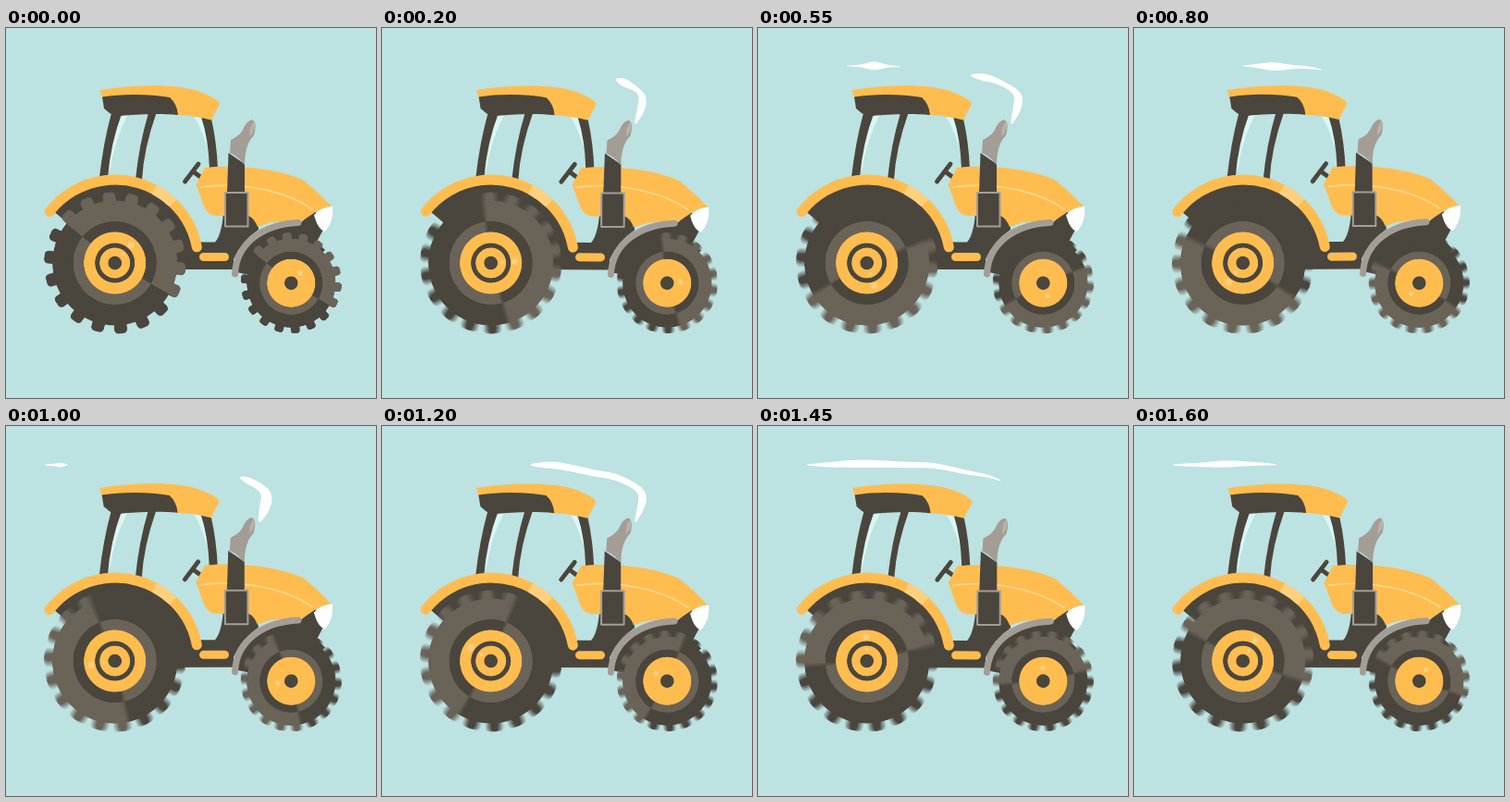
Write an HTML page with a canvas that moves like this. It is 400x400 px and loops after 1650 ms.

```html
<!DOCTYPE html>
<html lang="en">
<head>
<meta charset="utf-8">
<title>Tractor</title>
<style>
  html, body { margin: 0; width: 100%; height: 100%; overflow: hidden; background: #bce2e1; }
  canvas { display: block; width: 400px; height: 400px; }
</style>
</head>
<body>
<canvas id="stage"></canvas>
<script>
const LOOP = 1650, STEP = 50, TAU = Math.PI * 2, RAD = Math.PI / 180;
const SKY = '#bce2e1', ORANGE = '#ffbd50', PALE = '#ffd07d', DARK = '#4a463d',
      TAUPE = '#6a6358', GREY = '#a39d96', SILVER = '#b8b2aa', GLASS = '#d9f6f4';

function makeCanvas(size, scale, el = document.createElement('canvas')) {
  el.width = el.height = size * scale;
  const c = el.getContext('2d');
  c.scale(scale, scale);
  return c;
}

const dpr = window.devicePixelRatio || 1;
const view = makeCanvas(400, dpr, document.getElementById('stage'));
const scene = makeCanvas(400, dpr);
const exposure = makeCanvas(400, dpr);
const clamp01 = v => Math.max(0, Math.min(1, v));
const bell = v => Math.exp(-v * v);

function disc(c, x, y, r, color) {
  c.fillStyle = color;
  c.beginPath();
  c.arc(x, y, r, 0, TAU);
  c.fill();
}

// ---- wheels ----
function makeWheel({ outer, tire, rim, hub, rings, spots }) {
  const c = makeCanvas(160, 2);
  c.translate(80, 80);

  const tread = color => {
    disc(c, 0, 0, tire, color);
    const w = outer * 0.18;
    for (let i = 0; i < 18; i++) {
      c.save();
      c.rotate((5 + i * 20) * RAD);
      c.beginPath();
      c.roundRect(tire - 10, -w / 2, outer - tire + 10, w, outer * 0.055);
      c.fill();
      c.restore();
    }
  };
  const sector = (from, to, paint) => {
    c.save();
    c.beginPath();
    c.moveTo(0, 0);
    c.arc(0, 0, 80, from * RAD, to * RAD);
    c.clip();
    paint();
    c.restore();
  };

  tread(DARK);
  sector(-141, 30, () => tread(TAUPE));
  disc(c, 0, 0, rim, DARK);
  sector(30, 219, () => disc(c, 0, 0, rim, TAUPE));
  disc(c, 0, 0, hub, ORANGE);
  for (const [r, color] of rings) disc(c, 0, 0, r, color);
  for (const [d, r] of spots)
    disc(c, d * Math.cos(-48 * RAD), d * Math.sin(-48 * RAD), r, PALE);
  return c.canvas;
}

const rear = makeWheel({
  outer: 76.5, tire: 67.5, rim: 45, hub: 33.5,
  rings: [[21.5, DARK], [16.5, ORANGE], [7.3, DARK]],
  spots: [[26, 3.8], [12.5, 2]]
});
const front = makeWheel({
  outer: 54.5, tire: 48, rim: 34, hub: 26,
  rings: [[7.2, DARK]],
  spots: [[14.5, 2.8]]
});

function drawWheel(c, sprite, x, y, angle) {
  c.save();
  c.translate(x, y);
  c.rotate(angle * RAD);
  c.drawImage(sprite, -80, -80, 160, 160);
  c.restore();
}

// ---- smoke ----
const trail = [[274, 104], [281, 74], [257, 57], [225, 50], [190, 43],
               [160, 42], [130, 41], [100, 41], [70, 42], [42, 42]];
const puffs = [
  { start: 50, release: 320, thin: 3.5, bulge: 10 },
  { start: 350, release: 640, thin: 5, bulge: 7 },
  { start: 850, release: 1370, thin: 7, bulge: 4 }
];

// Point on a smooth curve through the trail, 0 at the pipe and 1 at the far end.
function trailPoint(p) {
  const last = trail.length - 1, u = clamp01(p) * last;
  const i = Math.min(Math.floor(u), last - 1), k = u - i;
  const at = j => trail[Math.max(0, Math.min(last, j))];
  return [0, 1].map(n => {
    const a = at(i - 1)[n], b = at(i)[n], c = at(i + 1)[n], d = at(i + 2)[n];
    return b + 0.5 * k * (c - a + k * (2 * a - 5 * b + 4 * c - d + k * (3 * (b - c) + d - a)));
  });
}

// The head leaves at once, the tail lets go later and catches up.
function drawPuff(c, { start, release, thin, bulge }, t) {
  const head = clamp01((t - start) / 630), tail = clamp01((t - release) / 400);
  if (head <= tail) return;
  const heavy = 0.92 - 0.75 * tail;
  const left = [], right = [], count = 80;
  for (let i = 0; i <= count; i++) {
    const f = i / count, p = tail + (head - tail) * f;
    const [x, y] = trailPoint(p);
    const [x1, y1] = trailPoint(p - 0.003), [x2, y2] = trailPoint(p + 0.003);
    const len = Math.hypot(x2 - x1, y2 - y1);
    const swell = bulge * bell((f - heavy) / 0.2) + 6 * bell((p - 0.07) / 0.06);
    const ends = Math.sqrt(clamp01(Math.sin(Math.PI * f)));
    const r = ends * (thin + swell) * (1 - 0.6 * tail) / 2;
    const nx = (y1 - y2) / len * r, ny = (x2 - x1) / len * r;
    left.push([x + nx, y + ny]);
    right.unshift([x - nx, y - ny]);
  }
  c.fillStyle = '#fff';
  c.beginPath();
  for (const point of left.concat(right)) c.lineTo(...point);
  c.fill();
}

// ---- body ----
function drawBody(c) {
  const fill = (color, d) => {
    c.fillStyle = color;
    c.fill(new Path2D(d));
  };
  const line = (color, width, d) => {
    c.strokeStyle = color;
    c.lineWidth = width;
    c.stroke(new Path2D(d));
  };
  const fender = (color, from, to) => {
    c.strokeStyle = color;
    c.lineWidth = 11;
    c.beginPath();
    c.arc(118, 254, 90, from * RAD, to * RAD);
    c.stroke();
  };
  c.lineCap = c.lineJoin = 'round';

  // cab
  fill(GLASS, 'M124 93H132Q117 122 113 152L109 158Q113 125 124 93Z');
  fill(GLASS, 'M203 95L212 97Q219 120 220 140Q215 115 203 95Z');
  fill(DARK, 'M114 92L125 93Q113 125 110 162H101Q105 125 114 92Z');
  fill(DARK, 'M154 92H162.5Q149 130 147 164H140Q144 125 154 92Z');
  fill(DARK, 'M211 96L222 98Q228 125 229 153H220Q219 120 211 96Z');
  fill(ORANGE, 'M101.5 67C140 61 185 60 210 69Q230 77 231 82L222 99.5Q205 95 186 94L104 76Z');
  fill(DARK, 'M104 74.5C125 71 155 71 177 75Q185 82 186 94C165 92 140 93 118 95.5Q111 92 106 87Z');
  line(DARK, 4.8, 'M193.5 166L208 147M202 155L213 163');

  // chassis
  fill(DARK, 'M235 200H262Q274 207 273 218Q255 230 246 250V261H150V231.5H226Q233 224 235 200Z');
  fill(DARK, 'M249 264C251 232 280 213 318 211L334 197L343 218L336 231L345 240L308 276Z');
  line(ORANGE, 9, 'M213.5 247.5H236.5');

  // hood
  fill(ORANGE, 'M215 151C250 147 298 153 322 165Q338 178 352 193Q341 194 333 200L318 210Q292 206 272 215Q268 205 262 203H226Q217 202 213 190L205.5 169Z');
  line('#ffd98f', 1.6, 'M210 172C250 166 302 175 331 196');
  fill('#fff', 'M353 193Q355 208 345 220Q337 218 333 202Q342 193 353 193Z');
  line(GREY, 7, 'M247.5 266C249 232 279 212 316 210.5');

  // exhaust
  fill(DARK, 'M240.5 135L258 147V179H239Z');
  fill(GREY, 'M242 135L243 121Q254 116 257 108Q260 101 266 99Q272 102 268 116Q258 126 258 148Q250 138 242 135Z');
  fill(SILVER, 'M268 101Q272 106 264 117Q262 108 268 101Z');
  fill(DARK, 'M237 178H261.5V214.5H237Z');
  line(GREY, 2, 'M237 178H261.5V214.5H237Z');

  // rear fender
  c.fillStyle = DARK;
  c.beginPath();
  c.moveTo(118, 254);
  c.arc(118, 254, 87, 220 * RAD, 349 * RAD);
  c.fill();
  fender(ORANGE, 218, 349);
  c.lineCap = 'butt';
  fender(PALE, 298, 314);
}

function draw(t) {
  scene.fillStyle = SKY;
  scene.fillRect(0, 0, 400, 400);
  puffs.forEach(p => drawPuff(scene, p, t));

  // The body rocks slightly around the rear axle.
  scene.save();
  scene.translate(118, 254);
  scene.rotate(0.22 * Math.sin(3 * Math.PI * t / LOOP) * RAD);
  scene.translate(-118, -254);
  drawBody(scene);
  scene.restore();

  // Averaging several exposures blurs the turning wheels.
  const copies = t ? 6 : 1;
  for (let i = 0; i < copies; i++) {
    const angle = 360 * t / LOOP + (i - (copies - 1) / 2);
    exposure.drawImage(scene.canvas, 0, 0, 400, 400);
    drawWheel(exposure, rear, 117.7, 254, angle);
    drawWheel(exposure, front, 308.3, 275.7, angle);
    view.globalAlpha = 1 / (i + 1);
    view.drawImage(exposure.canvas, 0, 0, 400, 400);
  }
}

const start = performance.now();
function tick() {
  const t = (performance.now() - start + 2) % LOOP;
  draw(Math.floor(t / STEP) * STEP);
  requestAnimationFrame(tick);
}
tick();
</script>
</body>
</html>
```
